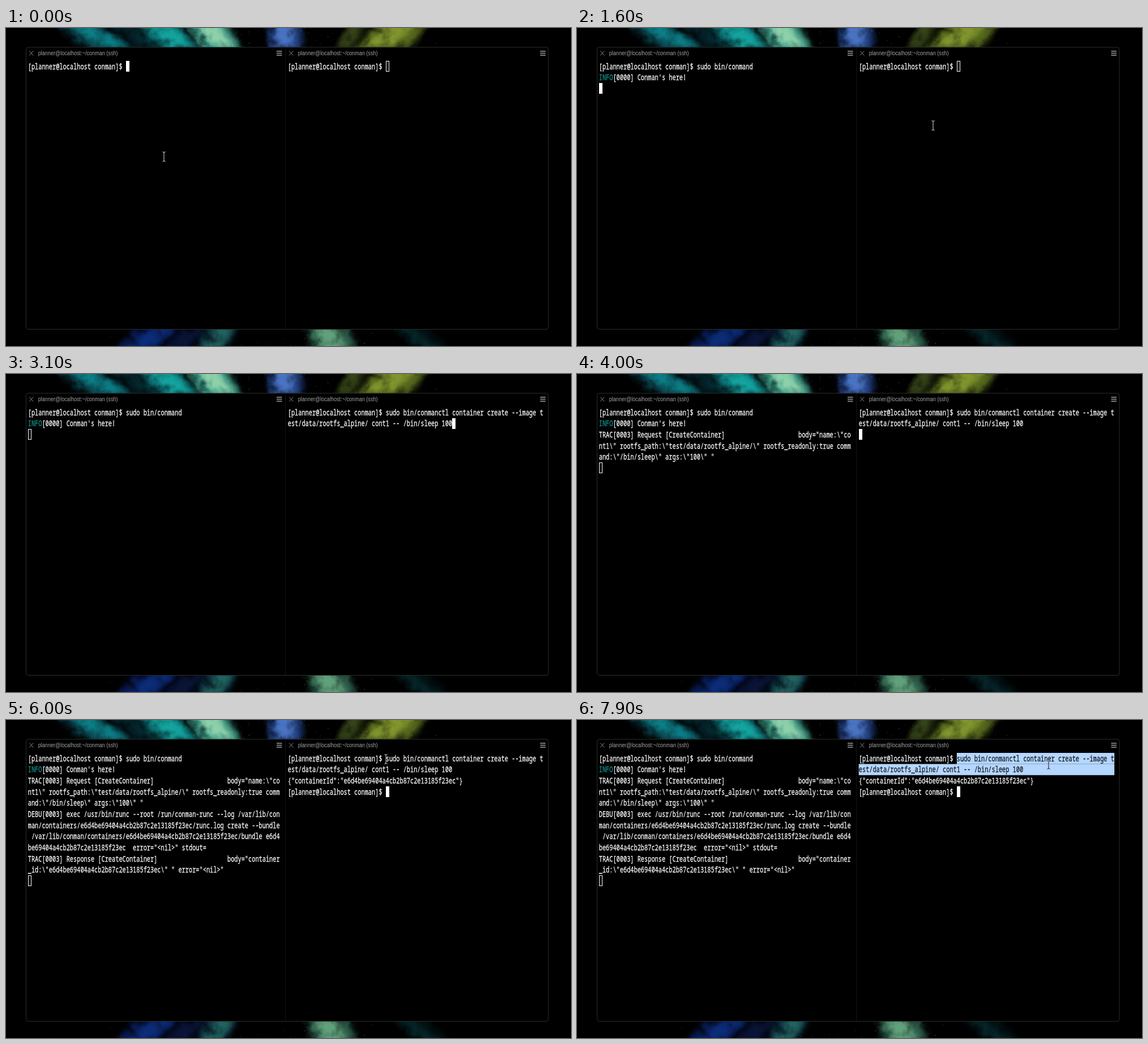
Recreate the animation shown at these times as an HTML page. Size 998 by 561 pixels, loop 8 s.

```html
<!DOCTYPE html>
<html lang="en">
<head>
<meta charset="utf-8">
<title>Two terminals</title>
<style>
  html, body { margin: 0; width: 100%; height: 100%; overflow: hidden; background: #000; }
  svg { position: absolute; left: 0; top: 0; width: 998px; height: 561px; }
  .mono { font: 15px "Noto Sans Mono", "DejaVu Sans Mono", monospace; white-space: pre; stroke-width: .3; }
  .title { font: 11px "Liberation Sans", Arial, sans-serif; fill: #a0a0a0; }
  #mouse { mix-blend-mode: difference; }
</style>
</head>
<body>
<svg id="backdrop" viewBox="0 0 998 561">
  <defs>
    <filter id="powder" x="-40%" y="-40%" width="180%" height="180%" color-interpolation-filters="sRGB">
      <feGaussianBlur stdDeviation="5" result="soft"/>
      <feTurbulence type="fractalNoise" baseFrequency=".05" numOctaves="4" seed="4" result="noise"/>
      <feDisplacementMap in="soft" in2="noise" scale="14" xChannelSelector="R" yChannelSelector="G" result="cloud"/>
      <feColorMatrix in="noise" values="0 0 0 0 0  0 0 0 0 0  0 0 0 0 0  1.2 0 0 0 .3" result="grain"/>
      <feComposite in="cloud" in2="grain" operator="in"/>
    </filter>
  </defs>
</svg>
<svg id="stage" viewBox="0 0 998 561">
  <rect x="35.5" y="34" width="922.5" height="497.5" rx="4" fill="#000" stroke="#2b2e2a"/>
  <path d="M493.5 35V531" stroke="#131313"/>
</svg>
<script>
const NS = "http://www.w3.org/2000/svg";
const WIDTH = 998, HEIGHT = 561, LOOP = 8000;
const CELL = 6.185, ROW = 19.65, TOP = 58;
const FACE_SCALE = CELL / 9;
const stage = document.getElementById("stage");
const backdrop = document.getElementById("backdrop");

function add(parent, tag, attrs = {}, text) {
  const node = document.createElementNS(NS, tag);
  for (const key in attrs) node.setAttribute(key, attrs[key]);
  if (text !== undefined) node.textContent = text;
  parent.append(node);
  return node;
}

let seed = 7;
function random() {
  seed = (seed * 16807) % 2147483647;
  return seed / 2147483647;
}

function speck(cx, cy, fill) {
  add(backdrop, "circle", { cx, cy, r: .3 + random() * .5, fill, opacity: .2 + random() * .5 });
}

// A dim beam of powder with a bright core, leaning toward the middle of the stage
function beam(edge, x, width, dim, bright) {
  const outward = edge ? 1 : -1;
  const lean = (x - WIDTH / 2) * .12;
  const body = (w, reach) => {
    const near = edge - outward * reach, far = edge + outward * 12;
    const a = x - lean - w / 2, b = x + lean - w / 2;
    return `${a},${near} ${a + w},${near} ${b + w},${far} ${b},${far}`;
  };
  add(backdrop, "polygon", { fill: dim, points: body(width, 45), filter: "url(#powder)" });
  add(backdrop, "polygon", { fill: bright, points: body(width * .55, 32), filter: "url(#powder)" });
  for (let i = 0; i < 28; i++) {
    speck(x + (random() + random() - 1) * 90, edge - outward * random() * 33, bright);
  }
}

beam(0, 157, 80, "#0a4650", "#0c8088");
beam(0, 226, 40, "#031c22", "#052c33");
beam(0, 286, 72, "#0b6c70", "#14a49e");
beam(0, 368, 72, "#3b9c88", "#8dd0aa");
beam(0, 493, 62, "#1d3874", "#4a74c2");
beam(0, 612, 34, "#1e270c", "#38471a");
beam(0, 682, 92, "#53661c", "#82952e");
beam(HEIGHT, 252, 76, "#07194e", "#0c2c78");
beam(HEIGHT, 318, 50, "#050c26", "#0a1536");
beam(HEIGHT, 374, 54, "#0b2d3c", "#236560");
beam(HEIGHT, 574, 78, "#2a5a48", "#61a07a");
beam(HEIGHT, 732, 56, "#031214", "#06262a");
for (let i = 0; i < 150; i++) speck(random() * WIDTH, random() * HEIGHT, i % 2 ? "#232815" : "#101c44");

const PROMPT = "[planner@localhost conman]$ ";
const ID = "e6d4be69404a4cb2b87c2e13185f23ec";
const DAEMON = "sudo bin/conmand";
const CREATE = "sudo bin/conmanctl container create --image test/data/rootfs_alpine/ cont1 -- /bin/sleep 100";
const INFO = "\nINFO[0000] Conman's here!\n";
const REQUEST = "TRAC[0003] Request [CreateContainer]".padEnd(57) +
  String.raw`body="name:\"cont1\" rootfs_path:\"test/data/rootfs_alpine/\" rootfs_readonly:true command:\"/bin/sleep\" args:\"100\" "` + "\n";
const EXEC = `DEBU[0003] exec /usr/bin/runc --root /run/conman-runc --log /var/lib/conman/containers/${ID}/runc.log` +
  ` create --bundle /var/lib/conman/containers/${ID}/bundle ${ID}  error="<nil>" stdout=\n`;
const RESPONSE = "TRAC[0003] Response [CreateContainer]".padEnd(57) +
  `body="container_id:\\"${ID}\\" " error="<nil>"\n`;

function makePane(x, cols, menuX) {
  add(stage, "path", { d: `M${x + 2.5} 40.5l7 8m0-8l-7 8`, stroke: "#858585", fill: "none" });
  add(stage, "text", { class: "title", transform: `translate(${x + 18} 48) scale(.828 1)` }, "planner@localhost:~/conman (ssh)");
  add(stage, "path", { d: `M${menuX} 41h9.5m-9.5 3.5h9.5m-9.5 3.5h9.5`, stroke: "#a2a2a2", "stroke-width": 1.6 });
  const marks = [0, 1].map(() => add(stage, "rect", { fill: "#b5d6ff", height: ROW }));
  const cursor = add(stage, "rect", { stroke: "#fff" });
  const rows = Array.from({ length: 12 }, (_, i) => add(stage, "text", {
    class: "mono", "xml:space": "preserve",
    transform: `translate(${x} ${TOP + 14.7 + i * ROW}) scale(${FACE_SCALE} 1)`
  }));
  return { x, cols, marks, cursor, rows };
}

function wrap(text, cols) {
  return text.split("\n").flatMap(line => line.match(new RegExp(`.{1,${cols}}`, "g")) || [""]);
}

// spans holds, per row, the selected columns [from, to]
function drawPane(pane, text, focused, spans = []) {
  const lines = wrap(text, pane.cols);
  pane.rows.forEach((row, i) => {
    const line = lines[i] || "";
    const [from, to] = spans[i] || [0, 0];
    const key = `${line}|${from}|${to}`;
    if (row.key === key) return;
    row.key = key;
    row.textContent = "";
    const parts = line.startsWith("INFO")
      ? [["#16918e", 0, 4], ["#fff", 4]]
      : [["#fff", 0, from], ["#111820", from, to], ["#fff", to]];
    for (const [fill, start, end] of parts) {
      const piece = line.slice(start, end);
      if (piece) add(row, "tspan", { fill, stroke: fill }, piece);
    }
  });
  pane.marks.forEach((mark, i) => {
    const [from, to] = spans[i] || [0, 0];
    mark.setAttribute("x", pane.x + from * CELL);
    mark.setAttribute("y", TOP + i * ROW);
    mark.setAttribute("width", (to - from) * CELL);
  });
  const last = lines.length - 1;
  const box = {
    x: Math.round(pane.x + lines[last].length * CELL) + .5, y: Math.round(TOP + last * ROW) + .5,
    width: 5, height: 18, fill: focused ? "#fff" : "none"
  };
  for (const key in box) pane.cursor.setAttribute(key, box[key]);
}

const left = makePane(38.7, 72, 478);
const right = makePane(497.7, 73, 943.5);
const mouse = add(stage, "path", {
  id: "mouse", fill: "none", stroke: "#ddd",
  d: "M-2.5-8.5Q0-8.5 0-6.5Q0-8.5 2.5-8.5M0-6.5V6.5M-2.5 8.5Q0 8.5 0 6.5Q0 8.5 2.5 8.5"
});

// Pointer moves: start, end, destination
const moves = [
  [1000, 1600, 629, 172],
  [4600, 5000, 608, 137],
  [5300, 5900, 671, 69],
  [6400, 7500, 833, 78]
];

function progress(t, start, end) {
  return Math.min(1, Math.max(0, (t - start) / (end - start)));
}

function pointerAt(t) {
  let x = 279, y = 227;
  for (const [start, end, toX, toY] of moves) {
    const p = progress(t, start, end), eased = p * p * (3 - 2 * p);
    x += (toX - x) * eased;
    y += (toY - y) * eased;
  }
  return [x, y];
}

function leftText(t) {
  const typed = Math.round(DAEMON.length * progress(t, 100, 650));
  return PROMPT + DAEMON.slice(0, typed) + (t >= 800 ? INFO : "") +
    (t >= 3800 ? REQUEST : "") + (t >= 4200 ? EXEC : "") + (t >= 4300 ? RESPONSE : "");
}

function rightText(t) {
  return PROMPT + (t >= 2800 ? CREATE : "") + (t >= 3700 ? "\n" : "") +
    (t >= 4300 ? `{"containerId":"${ID}"}\n${PROMPT}` : "");
}

function selection(t, x, y) {
  if (t < 6400) return [];
  const start = PROMPT.length;
  if (y > TOP + ROW) return [[start, right.cols], [0, right.cols]];
  return [[start, Math.max(start, Math.round((x - right.x) / CELL))]];
}

function render(time) {
  const t = Math.floor((time % LOOP) / 100) * 100;
  const [x, y] = pointerAt(t);
  const rightFocused = t >= 1700;
  drawPane(left, leftText(t), !rightFocused);
  drawPane(right, rightText(t), rightFocused, selection(t, x, y));
  const hidden = (t >= 100 && t < 1000) || (t >= 2700 && t < 4600);
  mouse.setAttribute("visibility", hidden ? "hidden" : "visible");
  mouse.setAttribute("transform", `translate(${x} ${y})`);
}

const began = performance.now();
function tick() {
  render(performance.now() - began);
  requestAnimationFrame(tick);
}
tick();
</script>
</body>
</html>
```
